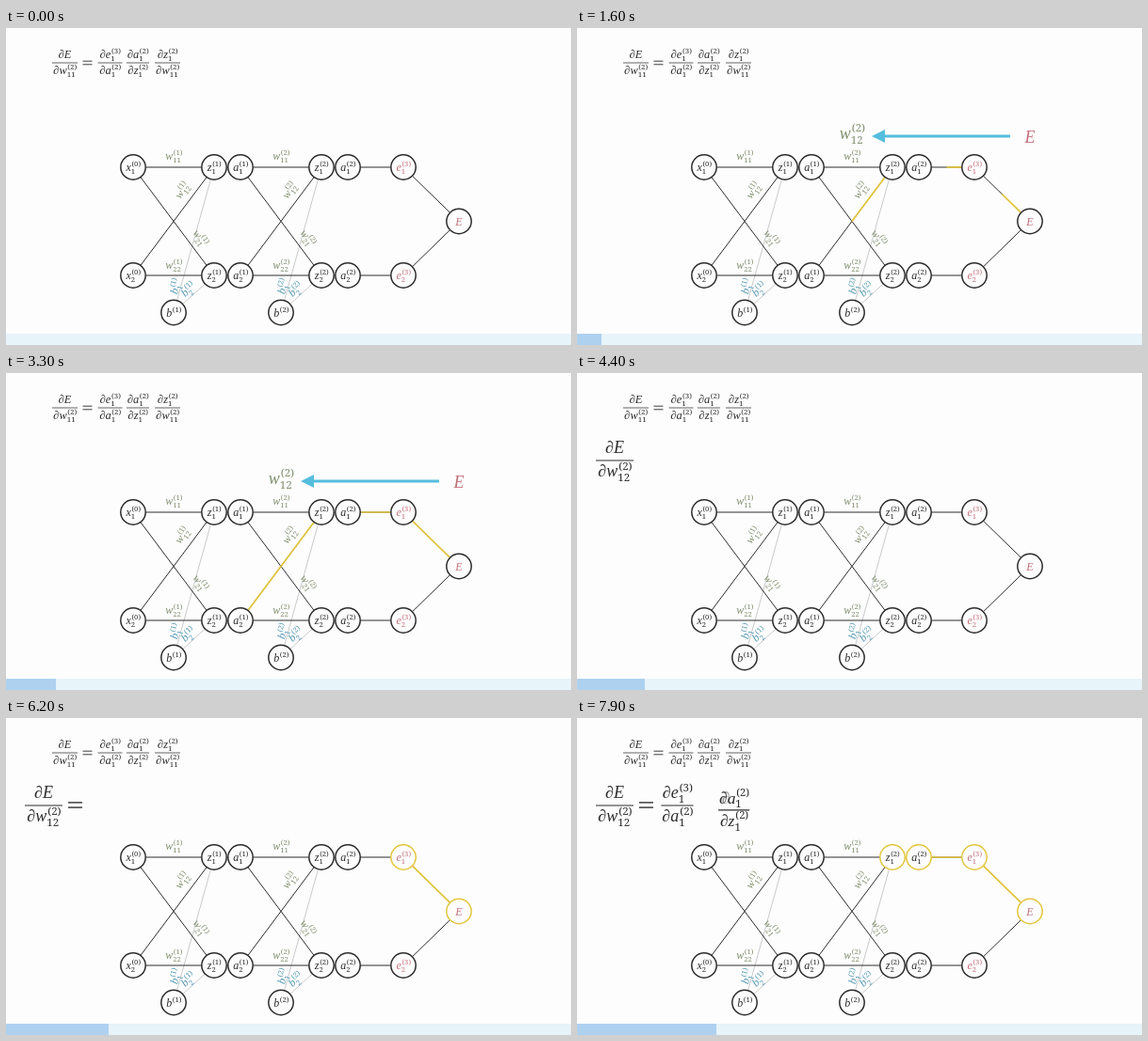
Write an HTML page with a canvas that moves like this. It is 600x337 px and loops after 8 s.

```html
<!DOCTYPE html>
<html lang="en">
<head>
<meta charset="utf-8">
<title>Backpropagation chain rule</title>
<style>
html, body { margin: 0; width: 100%; height: 100%; overflow: hidden; background: #fefdfe; }
canvas { display: block; }
</style>
</head>
<body>
<canvas id="stage" width="600" height="337"></canvas>
<script>
const ctx = document.getElementById("stage").getContext("2d");
const LOOP = 8000, R = 13.2;
const BG = "#fefdfe", INK = "#2c2c2c", RED = "#c0707a", GREEN = "#7f8f6c", BLUE = "#4f97b2",
  GOLD = "#e2c63c", CYAN = "#55bede", GREY = "#b9bdbc";
const SERIF = '"Liberation Serif", "Times New Roman", serif';
const SCRIPT = '"Noto Serif", "Liberation Serif", serif';

// Nodes: [x, y, letter, subscript, superscript]
const nodes = {
  x1: [135, 148, "x", "1", 0], x2: [135, 263, "x", "2", 0],
  e1: [422, 148, "e", "1", 3], e2: [422, 263, "e", "2", 3],
  E: [481, 205.5, "E"]
};
const edges = [["e1", "E"], ["e2", "E"], ["a12", "e1"], ["a22", "e2"]];
const biasEdges = [];
for (const layer of [1, 2]) {
  const dx = (layer - 1) * 114;
  for (const row of [1, 2]) {
    const y = row === 1 ? 148 : 263;
    nodes["z" + row + layer] = [221 + dx, y, "z", "" + row, layer];
    nodes["a" + row + layer] = [249 + dx, y, "a", "" + row, layer];
    biasEdges.push(["b" + layer, "z" + row + layer]);
    for (const from of [1, 2])
      edges.push([layer === 1 ? "x" + from : "a" + from + "1", "z" + row + layer]);
  }
  nodes["b" + layer] = [178 + dx, 302.5, "b", "", layer];
}

// Edge labels of one layer: [letter, subscript, x, y, degrees, colour]
const labels = [
  ["w", "11", 178, 139.5, 0, GREEN], ["w", "22", 178, 256, 0, GREEN],
  ["w", "12", 190, 175, -55, GREEN], ["w", "21", 203, 225, 55, GREEN],
  ["b", "1", 184, 276, -74, BLUE], ["b", "2", 196, 281, -43, BLUE]
];

const barPoints = [[0, 0], [1600, 26], [3300, 53], [4400, 72], [6200, 109], [7000, 126], [7900, 148], [8000, 150.5]];

const lerp = (a, b, p) => a + (b - a) * p;
const sigmoid = x => 1 / (1 + Math.exp(-x));

function smooth(t, start, length) {
  const u = Math.min(1, Math.max(0, (t - start) / length));
  const edge = sigmoid(-5);
  return (sigmoid(10 * (u - 0.5)) - edge) / (1 - 2 * edge);
}

function faded(alpha, draw) {
  if (alpha <= 0) return;
  ctx.save();
  ctx.globalAlpha *= Math.min(1, alpha);
  draw();
  ctx.restore();
}

function line(x1, y1, x2, y2, color, width) {
  ctx.strokeStyle = color;
  ctx.lineWidth = width;
  ctx.beginPath();
  ctx.moveTo(x1, y1);
  ctx.lineTo(x2, y2);
  ctx.stroke();
}

// Line between two node rims, drawn up to share p.
function edge(from, to, color, width, p = 1) {
  const [ax, ay] = nodes[from], [bx, by] = nodes[to];
  const k = R / Math.hypot(bx - ax, by - ay), end = lerp(k, 1 - k, p);
  line(lerp(ax, bx, k), lerp(ay, by, k), lerp(ax, bx, end), lerp(ay, by, end), color, width);
}

// Symbol centred on x with its baseline at y.
function symbol([base, sub = "", sup], x, y, size, color = INK) {
  const italic = `italic ${size}px ${SERIF}`, script = `${size * 0.64}px ${SCRIPT}`;
  const power = sup === undefined ? "" : `(${sup})`;
  ctx.fillStyle = color;
  ctx.font = script;
  const tail = Math.max(ctx.measureText(sub).width, ctx.measureText(power).width);
  ctx.font = italic;
  const head = ctx.measureText(base).width;
  const left = x - (head + tail) / 2;
  ctx.fillText(base, left, y);
  ctx.font = script;
  ctx.fillText(power, left + head + size * 0.05, y - size * 0.41);
  ctx.fillText(sub, left + head, y + size * 0.28);
}

function fraction(top, bottom, x, y, width, size) {
  symbol(top, x, y - size * 0.42, size);
  symbol(bottom, x, y + size * 0.96, size);
  line(x - width / 2, y, x + width / 2, y, INK, size / 17);
}

function equals(x, y, width, gap) {
  for (const d of [-gap, gap]) line(x, y + d, x + width, y + d, INK, width / 11);
}

function node(name, glow) {
  const [x, y, ...text] = nodes[name];
  ctx.beginPath();
  ctx.arc(x, y, R, 0, 2 * Math.PI);
  ctx.fillStyle = BG;
  ctx.fill();
  for (const [color, alpha] of [[INK, 1 - glow], [GOLD, glow]])
    faded(alpha, () => {
      ctx.strokeStyle = color;
      ctx.lineWidth = 1.5;
      ctx.stroke();
    });
  symbol(text, x, y + 4, 12, "eE".includes(text[0]) ? RED : INK);
}

function network(t) {
  for (const [a, b] of biasEdges) edge(a, b, GREY, 0.8);
  for (const [a, b] of edges) edge(a, b, INK, 1);

  // Path from the error back to the weight
  const trace = smooth(t, 1100, 1000);
  if (trace > 0) faded(1 - smooth(t, 3400, 700), () => {
    for (const [a, b] of [["E", "e1"], ["e1", "a12"], ["z12", "a21"]]) edge(a, b, GOLD, 1.7, trace);
  });

  const first = smooth(t, 5200, 900), second = smooth(t, 6200, 700), third = smooth(t, 7300, 500);
  if (first > 0) edge("E", "e1", GOLD, 1.7, first);
  if (second > 0) edge("e1", "a12", GOLD, 1.7, second);
  const glow = { E: smooth(t, 5100, 500), e1: first, a12: second, z12: third };
  for (const name in nodes) node(name, glow[name] || 0);

  for (const layer of [1, 2])
    for (const [letter, sub, x, y, turn, color] of labels) {
      ctx.save();
      ctx.translate(x + (layer - 1) * 114, y);
      ctx.rotate(turn * Math.PI / 180);
      symbol([letter, sub, layer], 0, 0, 12, color);
      ctx.restore();
    }
}

function smallFormula() {
  fraction(["∂E"], ["∂w", "11", 2], 62.5, 37, 27, 12.4);
  equals(81.5, 37, 10, 1.8);
  fraction(["∂e", "1", 3], ["∂a", "1", 2], 110.5, 37, 26, 12.4);
  fraction(["∂a", "1", 2], ["∂z", "1", 2], 140, 37, 24, 12.4);
  fraction(["∂z", "1", 2], ["∂w", "11", 2], 171.5, 37, 27, 12.4);
}

// Error and weight rise from the network, then travel to the large fraction.
function errorToWeight(t) {
  const rise = smooth(t, 100, 900), move = smooth(t, 3400, 1000);
  if (rise > 0 && move < 1) {
    const size = lerp(12, 18, rise), settled = move > 0.5;
    symbol(["E"], lerp(481, 45, move), lerp(lerp(209.5, 122, rise), 85.5, move), size, settled ? INK : RED);
    symbol(["w", "12", 2], lerp(lerp(304, 292, rise), 45, move), lerp(lerp(175, 117.5, rise), 110, move), size, settled ? INK : GREEN);
    faded(1 - smooth(t, 3400, 600), () => {
      const tip = lerp(460, 313, rise), head = 14 * rise;
      line(460, 115, tip + head, 115, CYAN, 3);
      ctx.fillStyle = CYAN;
      ctx.beginPath();
      ctx.moveTo(tip, 115);
      ctx.lineTo(tip + head, 115 - head / 2);
      ctx.lineTo(tip + head, 115 + head / 2);
      ctx.fill();
    });
  }
  faded(move, () => fraction(["∂E"], ["∂w", "12", 2], 40, 93, 40, 18));
  faded(smooth(t, 4600, 600), () => equals(66, 92.5, 15, 2.6));
}

// Fraction that flies from the network to its place in the formula.
function flyingFraction(t, start, top, bottom, fromX, toX) {
  const p = smooth(t, start, 800);
  const x = lerp(fromX, toX, p), y = lerp(148, 93, p), size = lerp(12, 18, p);
  faded(p * 1.1, () => {
    fraction(top, bottom, x, y, size * 1.9, size);
    if (p < 0.98) faded(0.5, () => symbol(["∂"], x - 13 + 50 * (1 - p), y - size * 0.42, size));
  });
}

function progress(t) {
  const i = barPoints.findIndex(([time]) => time > t);
  const [t0, w0] = barPoints[i - 1], [t1, w1] = barPoints[i];
  ctx.fillStyle = "#e7f4f9";
  ctx.fillRect(0, 325, 600, 12);
  ctx.fillStyle = "#aed1f0";
  ctx.fillRect(0, 325, lerp(w0, w1, (t - t0) / (t1 - t0)), 12);
}

function frame() {
  const t = performance.now() % LOOP;
  ctx.fillStyle = BG;
  ctx.fillRect(0, 0, 600, 337);
  smallFormula();
  network(t);
  errorToWeight(t);
  flyingFraction(t, 6260, ["∂e", "1", 3], ["∂a", "1", 2], 392, 106.5);
  flyingFraction(t, 7320, ["∂a", "1", 2], ["∂z", "1", 2], 348, 149);
  progress(t);
  requestAnimationFrame(frame);
}
frame();
</script>
</body>
</html>
```
